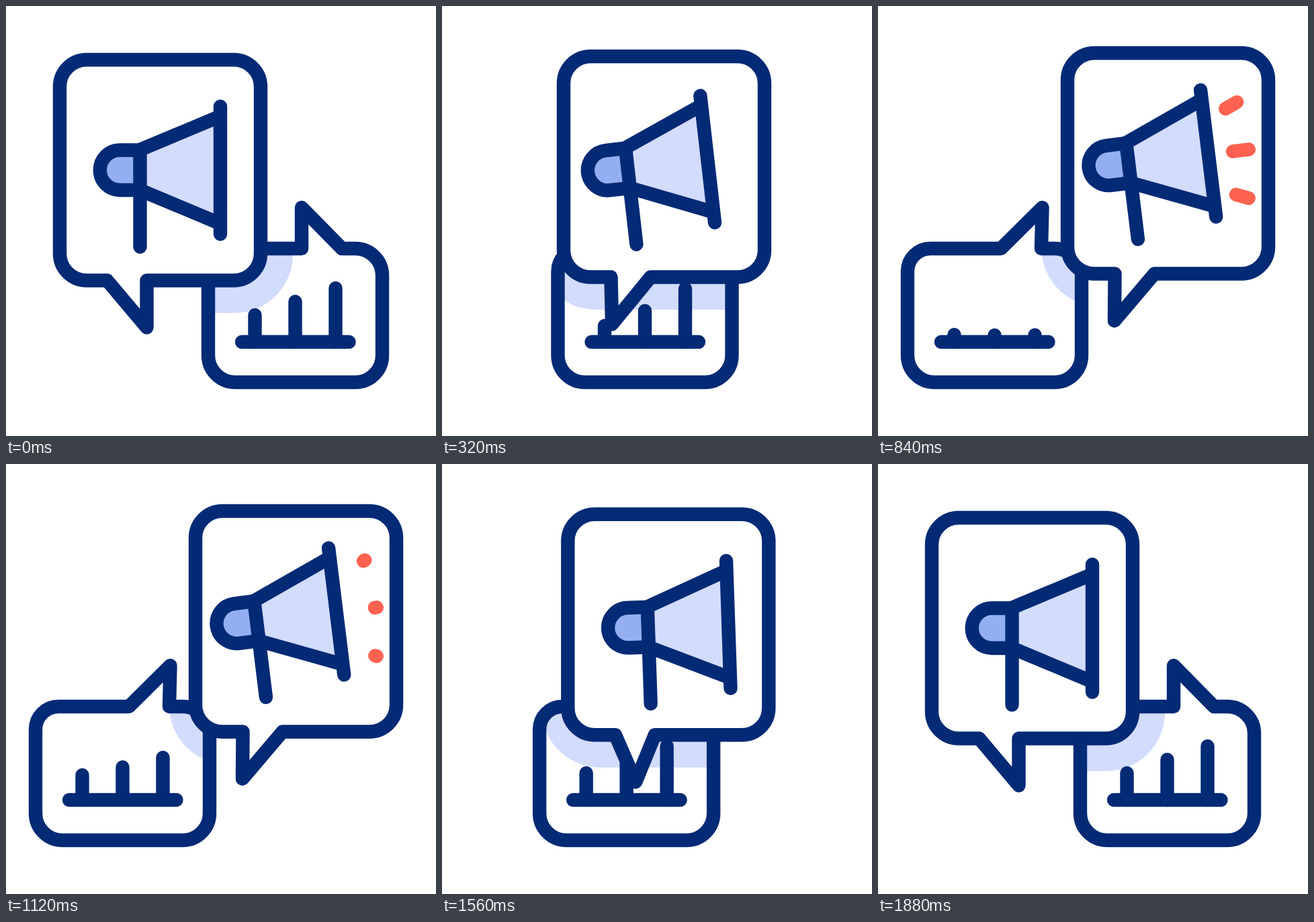
An HTML page for the animation above (2000 ms loop, 640 px wide and 640 px high).

```html
<!DOCTYPE html>
<html lang="en">
<head>
<meta charset="utf-8">
<title>Speech bubbles</title>
<style>
  html, body { margin: 0; width: 100%; height: 100%; overflow: hidden; background: #fff; }
  svg { display: block; width: 100%; height: 100%; }
  .line { fill: none; stroke: #032a75; stroke-width: 20.4; stroke-linecap: round; stroke-linejoin: round; }
  .paper { fill: #fff; }
  .light { fill: #d2dcfd; }
  .mid { fill: #93aff1; }
  .ray { stroke: #ff6250; }
</style>
</head>
<body>
<svg viewBox="0 0 640 640">
  <defs>
    <clipPath id="backClip"><path id="clipShape"/></clipPath>
  </defs>

  <path id="backFill" class="paper"/>
  <g clip-path="url(#backClip)">
    <rect id="shadow" class="light" x="41" y="41" width="386" height="416" rx="87"/>
  </g>
  <g id="back">
    <path id="backLine" class="line"/>
    <path class="line" d="M351 500H510.5"/>
    <path id="bars" class="line"/>
  </g>

  <g id="front">
    <path id="frontLine" class="line paper"/>
    <g id="horn">
      <path class="light" d="M199.5 214L319 164V324L199.5 274Z"/>
      <path class="mid" d="M199.5 214.5H169.5A29.7 29.7 0 0 0 169.5 274H199.5Z"/>
      <path class="line" d="M199.5 214.5H169.5A29.7 29.7 0 0 0 169.5 274H199.5"/>
      <path class="line" d="M319 164L199.5 214V358.5M199.5 274L319 324M319 149.5V339.5"/>
      <path id="rays" class="line ray"/>
    </g>
  </g>
</svg>
<script>
  const LOOP = 2000, STEP = 40, START = 40;
  const $ = id => document.getElementById(id);
  const set = (id, name, value) => $(id).setAttribute(name, value);
  const mix = (a, b, k) => a + (b - a) * k;

  // Smooth 0 to 1 between two times.
  function rise(t, from, to) {
    const x = Math.min(1, Math.max(0, (t - from) / (to - from)));
    return x * x * (3 - 2 * x);
  }

  // Out from START until `out`, then back between `from` and `to`.
  const swing = (t, out, from, to) => rise(t, START, out) - rise(t, from, to);

  // A smooth bump, up and down again.
  const bump = (t, from, top, to) => rise(t, from, top) - rise(t, top, to);

  const backPath = tip =>
    `M335 361H440L${tip} 300L500 361H520A40 40 0 0 1 560 401V520` +
    'A40 40 0 0 1 520 560H341A40 40 0 0 1 301 520V395A34 34 0 0 1 335 361Z';

  const frontPath = tip =>
    'M120 80H339A40 40 0 0 1 379 120V368.5A40 40 0 0 1 339 408.5H209.5' +
    `L${tip} 478.5L150.5 408.5H120A40 40 0 0 1 80 368.5V120A40 40 0 0 1 120 80Z`;

  // Each bar dips, peaks, dips, peaks, dips and rests, later from left to right.
  function barTop(t, i) {
    const rest = 460 - 20 * i, high = rest - 20, low = 480, floor = 490;
    const dip = 366 + 51 * i, peak = 615 + 17 * i, peak2 = 1032 + 6 * i;
    const middle = (peak + peak2) / 2;
    return rest
      + (low - rest) * rise(t, dip - 160, dip)
      + (high - low) * rise(t, dip, peak)
      + (floor - high) * bump(t, peak, middle, peak2)
      + (low - high) * rise(t, peak2, peak2 + 160)
      + (rest - low) * rise(t, peak2 + 160, peak2 + 320 + 64 * i);
  }

  // Three rays fan out from the horn; the middle one reaches furthest.
  function rayPath(from, to) {
    if (to - from < 0.01) return '';
    return [-1, 0, 1].map(k => {
      const at = p => `${mix(355.5 - 3 * k * k, 379.5 - 9 * k * k, p)} ${246 + k * mix(64.4, 72, p)}`;
      return `M${at(from)}L${at(to)}`;
    }).join('');
  }

  function draw(t) {
    const frontMove = swing(t, 600, 1262, 1884);
    const frontShift = `translate(${202 * frontMove} ${-10 * frontMove})`;
    const backShift = `translate(${-257 * swing(t, 600, 1320, 1880)} 0)`;

    const backShape = backPath(mix(440, 501.5, swing(t, 369, 1320, 1649)));
    for (const id of ['backFill', 'clipShape', 'backLine']) set(id, 'd', backShape);
    for (const id of ['backFill', 'clipShape', 'back']) set(id, 'transform', backShift);
    set('bars', 'd', [0, 1, 2].map(i => `M${370.5 + 60 * i} 500V${barTop(t, i)}`).join(''));

    set('front', 'transform', frontShift);
    set('shadow', 'transform', frontShift);
    set('frontLine', 'd', frontPath(mix(209.5, 150, swing(t, 355, 1335, 1773))));

    const turn = -7 * swing(t, 373, 1360, 1667);
    const slide = -28.5 * swing(t, 413, 1260, 1565);
    const drop = 2.5 * bump(t, START, 320, 560) + 11.2 * bump(t, 1260, 1440, 1640);
    set('horn', 'transform', `translate(${slide} ${drop}) rotate(${turn} 195 244)`);
    set('rays', 'd', rayPath(rise(t, 980, 1160), rise(t, 440, 600)));
  }

  const begin = performance.now();
  function tick() {
    const t = (performance.now() - begin) % LOOP;
    draw(Math.floor(t / STEP) * STEP);
    requestAnimationFrame(tick);
  }
  tick();
</script>
</body>
</html>
```
